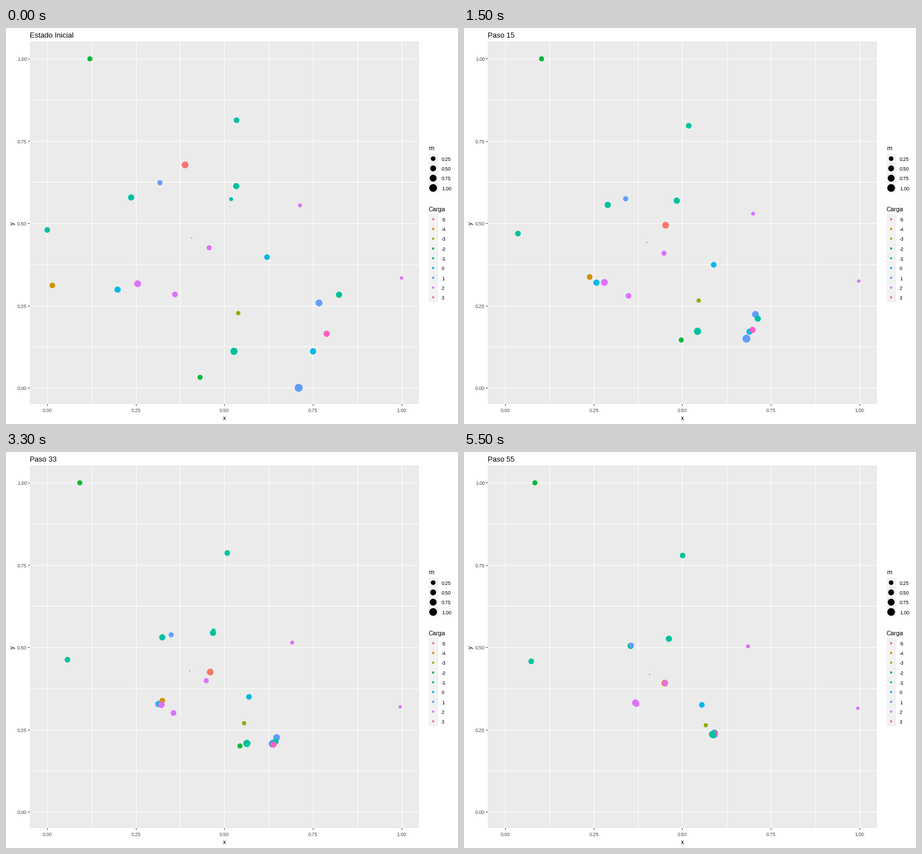
These frames come from a looping animation (800 by 700 pixels, 5600 ms). A matplotlib script:

```python
import numpy as np
import matplotlib.pyplot as plt
from matplotlib.animation import FuncAnimation
from matplotlib.patches import Rectangle

W, H, DPI = 800, 700, 100
STEPS, INTERVAL = 56, 100
PX = 72 / DPI  # points per pixel

plt.rcParams["font.family"] = "Liberation Sans"

HUES = {-5: "#F8766D", -4: "#D39200", -3: "#93AA00", -2: "#00BA38",
        -1: "#00C19F", 0: "#00B9E3", 1: "#619CFF", 2: "#DB72FB", 3: "#FF61C3"}

fig = plt.figure(figsize=(W / DPI, H / DPI), dpi=DPI, facecolor="white")
ax = fig.add_axes([0, 0, 1, 1])
ax.set_xlim(0, W)
ax.set_ylim(H, 0)
ax.axis("off")

# Share of the way done at each step: fast at first, ever slower
ease = np.log1p(np.arange(STEPS) / 10) / np.log1p((STEPS - 1) / 10)
ease = ease[:, None]

paths, radii, colors = [], [], []


def travel(charge, radius, start, end, bend=(0, 0)):
    """Eased arc; bend is its offset from the straight line halfway."""
    a, b, c = (np.array(p, float) for p in (start, end, bend))
    paths.append(a + (b - a) * ease + 4 * ease * (1 - ease) * c)
    radii.append(radius)
    colors.append(HUES[charge])


def drift(charge, radius, start, shift, bend=(0, 0)):
    travel(charge, radius, start, np.add(start, shift), bend)


def gather(hub, *members, gap=2.5):
    """Bring the members together, each stopping on its own side of the hub."""
    for charge, radius, start, bend in members:
        away = np.subtract(start, hub)
        end = hub + gap * away / np.hypot(*away)
        travel(charge, radius, start, end, bend)


drift(-2, 4.5, (148.5, 54.5), (-23, 0))
drift(-1, 5, (408, 163), (-21, 20))
drift(-1, 5, (73, 357), (46, 13))
drift(2, 3.5, (520.5, 313.5), (-18, 30))
drift(2, 3, (700, 442), (-3, 11))
drift(2, 1.2, (328.5, 371.5), (0, 22), (-5, -3))
drift(0, 5, (462, 405), (-41, 42), (0, -7))
drift(-3, 3.8, (411, 504), (17, -21), (-4, -12))

gather((356, 411),
       (-5, 6, (317, 242), (21, 25)),
       (2, 4.5, (359.5, 388.5), (-4, 0)))
gather((361, 332),
       (-1, 5.5, (407.5, 279.5), (-9, 1)),
       (-1, 3.5, (398.5, 302.5), (-5, -13)))
gather((297, 344),
       (-1, 5.5, (221.5, 299.5), (-3, -8)),
       (1, 4.5, (272.5, 273.5), (2, -5)))
gather((306, 443),
       (-4, 5, (82, 455), (32, -9)),
       (0, 5.5, (197.5, 462.5), (-15, -3)),
       (2, 6, (233, 452), (-19, 2)),
       (2, 5, (299, 471), (-11, 15)))
gather((441, 497),
       (1, 6, (554, 486), (16, 15)),
       (1, 7, (518, 636), (19, -20)),
       (0, 5.5, (543.5, 571.5), (11, 1)),
       (-1, 5.5, (589.5, 471.5), (2, 30)),
       (3, 5.5, (567.5, 540.5), (4, 14)),
       (-2, 4.5, (343.5, 617.5), (-6, -8)),
       (-1, 6.4, (403.5, 571.5), (-8, 0)))


def box(x, y, w, h, color):
    ax.add_patch(Rectangle((x, y), w, h, fc=color, lw=0))


def label(x, y, s, px, color="black", ha="left", va="baseline", **kw):
    return ax.text(x, y, s, fontsize=px * PX, color=color, ha=ha, va=va, **kw)


def dots(xy, r, c):
    return ax.scatter(*np.transpose(xy), s=(2 * np.array(r) * PX) ** 2, c=c,
                      linewidths=0, snap=False, zorder=3)


# Panel, grid and axes
LEFT, TOP, WIDE, TALL = 42, 24, 689, 641
BOTTOM = TOP + TALL
SMALL, MEDIUM, LARGE = 8.8, 11, 13
box(LEFT, TOP, WIDE, TALL, "#EBEBEB")
for k in range(9):
    gx, gy = int(73.2 + 78.4 * k), int(636.6 - 72.75 * k)
    box(gx, TOP, 1, TALL, "white")
    box(LEFT, gy, WIDE, 1, "white")
    if k % 2 == 0:
        value = f"{k / 8:.2f}"
        box(gx, BOTTOM, 1, 3, "#333333")
        box(LEFT - 3, gy, 3, 1, "#333333")
        label(gx, BOTTOM + 14, value, SMALL, "#4D4D4D", "center")
        label(LEFT - 5, gy + 4, value, SMALL, "#4D4D4D", "right")
label(386.5, 693, "x", MEDIUM, ha="center")
label(12, 345, "y", MEDIUM, ha="center", va="center", rotation=90)


def legend(name, top, names, r, c):
    rows = top + 8.9 + 17.28 * np.arange(len(names))
    label(748, top - 5.5, name, MEDIUM)
    box(748, top, 17, round(17.28 * len(names)), "#F2F2F2")
    dots([(756, y) for y in rows], r, c)
    for y, s in zip(rows, names):
        label(771, y + 4, s, SMALL)


masses = [0.25, 0.5, 0.75, 1]
legend("m", 222, [f"{m:.2f}" for m in masses],
       [1.4 + 5.4 * m ** 0.5 for m in masses], ["black"] * 4)
legend("Carga", 329, [str(c) for c in HUES], [2] * 9, list(HUES.values()))

title = label(LEFT, 17, "", LARGE)
tracks = np.array(paths)
cloud = dots(tracks[:, 0], radii, colors)


def draw(step):
    cloud.set_offsets(tracks[:, step])
    title.set_text(f"Paso {step:02d}" if step else "Estado Inicial")
    return cloud, title


def start():
    return draw(0)


anim = FuncAnimation(fig, draw, frames=STEPS, init_func=start,
                     interval=INTERVAL, repeat=True, repeat_delay=0)
plt.show()
```
